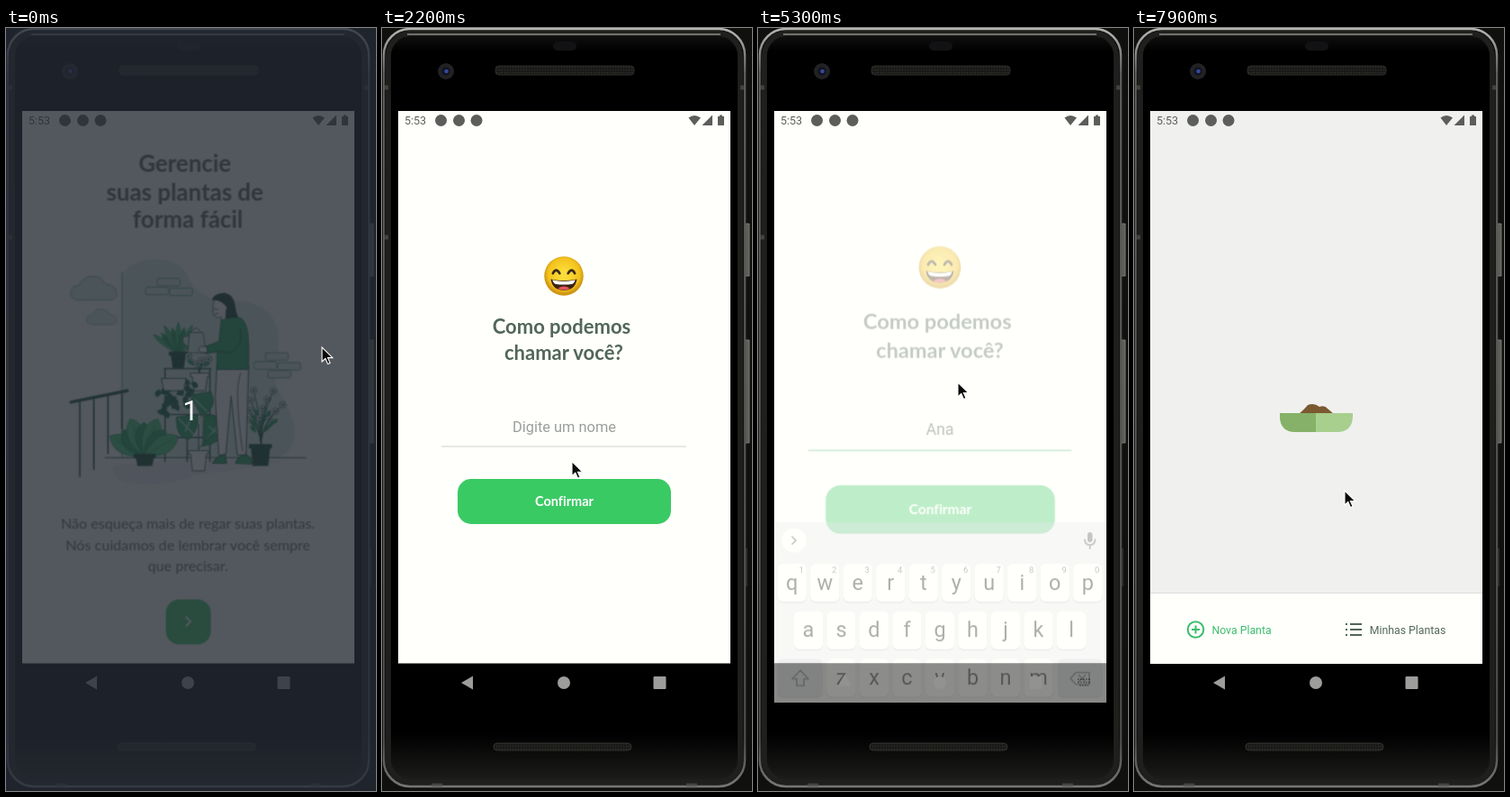
Write an HTML page that moves like this. It is 411x846 px and loops after 8000 ms.

```html
<!DOCTYPE html>
<html lang="pt-BR">
<head>
<meta charset="utf-8">
<title>Plantas</title>
<style>
html, body { margin: 0; width: 100%; height: 100%; overflow: hidden; background: #0c0c0b; }
svg { display: block; width: 100vw; height: 100vh; }
text { text-anchor: middle; font-family: Roboto, "Noto Sans", sans-serif; }
.jost { font-family: Lato, "Open Sans", sans-serif; fill: #5c6f64; font-variant-ligatures: none; }
.bold { font-weight: 700; fill: #52665a; }
.label { font-size: 14.5px; fill: #fff; }
.key { font-size: 23.5px; fill: #0c0c0c; }
.hint { font-size: 9.5px; fill: #55585c; }
.tip { font-size: 15.5px; fill: #55585c; }
.input { font-size: 16.4px; fill: #3a4a44; }
.card { transform-origin: 202px 405px; }
.line { fill: none; stroke: #4d5156; stroke-width: 1.7; stroke-linecap: round; stroke-linejoin: round; }
#back { transform-origin: 95px 726px; }
</style>
</head>
<body>
<svg viewBox="0 0 411 846" preserveAspectRatio="none">
  <defs>
    <clipPath id="screenClip"><path d="M18 92H387V704.500H18z"/></clipPath>
    <clipPath id="kbClip"><path d="M18 440H387V748H18z"/></clipPath>
    <linearGradient id="body" x2="0" y2="1">
      <stop offset="0" stop-color="#161616"/><stop offset=".03" stop-color="#000"/>
      <stop offset=".93" stop-color="#000"/><stop offset="1" stop-color="#20201e"/>
    </linearGradient>
    <linearGradient id="rim" x2="0" y2="1">
      <stop offset="0" stop-color="#b5b5b3"/><stop offset=".06" stop-color="#5c5c5a"/>
      <stop offset=".94" stop-color="#4a4a48"/><stop offset="1" stop-color="#777"/>
    </linearGradient>
    <radialGradient id="face" cy=".45">
      <stop offset=".2" stop-color="#fbdc38"/><stop offset=".8" stop-color="#f3c31d"/><stop offset="1" stop-color="#d09613"/>
    </radialGradient>
    <pattern id="mesh" width="3" height="3" patternUnits="userSpaceOnUse">
      <path d="M0 0H3V3H0z" fill="#191917"/><circle cx="1.500" cy="1.500" r=".8" fill="#30302c"/>
    </pattern>
    <g id="emoji">
      <circle r="37.500" fill="url(#face)"/>
      <path d="M-21-5Q-15-17-8-5M8-5Q15-17 21-5" fill="none" stroke="#3c2a18" stroke-width="4.500" stroke-linecap="round"/>
      <path d="M-25 6Q0 12 25 6Q22 27 0 27Q-22 27-25 6z" fill="#3d2213"/>
      <path d="M-22 7.500Q0 13 22 7.500Q20 14 17 15Q0 18-17 15Q-20 14-22 7.500z" fill="#fff"/>
      <path d="M-12 24Q0 16 12 24Q0 29-12 24z" fill="#e8565c"/>
    </g>
  </defs>

  <g id="phone">
    <path d="M0 0H411V846H0z" fill="#10100f"/>
    <path d="M403 217h5v58h-5zM403 346h5v114h-5z" fill="#5d5d59" stroke="#85857e" stroke-width=".8"/>
    <path d="M404 577h2v42h-2z" fill="#2a2a28"/>
    <rect x="2" y="1" width="401" height="840" rx="29" fill="url(#body)" stroke="url(#rim)" stroke-width="2.500"/>
    <rect x="7" y="6" width="391" height="830" rx="25" fill="none" stroke="#1f1f1d" stroke-width="6"/>
    <path d="M28 7H376" stroke="#8a8a88" stroke-width="1.500"/>
    <path d="M1 66h6M1 232h6M398 66h6M55 840h12M338 840h12" stroke="#5a5a57" stroke-width="5" opacity=".6"/>
    <rect x="190" y="15" width="26" height="10" rx="5" fill="#121214"/>
    <circle cx="71" cy="48" r="9" fill="#222225"/><circle cx="71" cy="48" r="4.500" fill="#10121f"/><circle cx="71.500" cy="48" r="2.300" fill="#38489a"/>
    <rect x="126" y="42" width="154" height="10" rx="4" fill="url(#mesh)" stroke="#2d2d29"/>
    <rect x="124" y="793" width="153" height="8" rx="4" fill="url(#mesh)" stroke="#33332f"/>
    <path d="M18 92H387V704.500H18z" fill="#fffffb"/>
  </g>

  <g clip-path="url(#screenClip)">
    <g id="welcome" class="card">
      <g font-size="26.500">
        <text class="jost bold" x="198.500" y="154">Gerencie</text>
        <text class="jost bold" x="198.500" y="186">suas plantas de</text>
        <text class="jost bold" x="202" y="217">forma fácil</text>
      </g>
      <g id="art" stroke-linecap="round" stroke-linejoin="round"></g>
      <g font-size="16.500">
        <text class="jost" x="202" y="559">Não esqueça mais de regar suas plantas.</text>
        <text class="jost" x="202" y="583">Nós cuidamos de lembrar você sempre</text>
        <text class="jost" x="202" y="607">que precisar.</text>
      </g>
      <g id="next">
        <rect x="177" y="639" width="51" height="51" rx="15" fill="#3aca64"/>
        <path d="M199.500 658.500l5.500 5.500-5.500 5.500" fill="none" stroke="#fff" stroke-width="2"/>
      </g>
    </g>

    <g id="naming" class="card"><g id="form">
      <use href="#emoji" transform="translate(202 275) scale(.58)"/>
      <g font-size="22">
        <text class="jost bold" x="199.500" y="339">Como podemos</text>
        <text class="jost bold" x="202" y="368">chamar você?</text>
      </g>
      <text id="placeholder" class="input" x="202.500" y="448" style="fill:#9b9f9c">Digite um nome</text>
      <g id="typed"></g>
      <path d="M66 464H338" stroke="#cfcfcf"/>
      <path id="focusLine" d="M66 464H338" stroke="#4dbb83" stroke-width="1.300"/>
      <g id="confirm">
        <rect x="84" y="500" width="237" height="50" rx="15" fill="#3aca64"/>
        <text class="jost bold label" x="202.500" y="530">Confirmar</text>
      </g>
    </g></g>

    <g id="done" class="card">
      <use href="#emoji" x="202" y="312"/>
      <text class="jost bold" x="202" y="393" font-size="28" style="fill:#0b0c0b">Prontinho!</text>
      <g font-size="15.400">
        <text class="jost" x="202" y="429">Agora vamos começar a cuidar das suas</text>
        <text class="jost" x="202" y="451">plantinhas com muito cuidado!</text>
      </g>
      <g id="start">
        <rect x="89" y="483" width="227" height="50" rx="15" fill="#3aca64"/>
        <text class="jost bold label" x="202.500" y="513">Começar</text>
      </g>
    </g>

    <g id="home" class="card">
      <path d="M18 92H387V705H18z" fill="#f0f1ee"/>
      <path d="M183 428Q190 422 193 418Q200 415 206 420Q212 418 215 422L222 428z" fill="#7b5931"/>
      <path d="M162 427H243V430Q243 448 225 448H180Q162 448 162 430z" fill="#a8cf8e"/>
      <path d="M162 427H202V448H180Q162 448 162 430z" fill="#85b168"/>
      <path d="M18 627H387V705H18z" fill="#fffffb"/><path d="M18 626.500H387" stroke="#dcdddb"/>
      <g fill="none" stroke="#3cbd6e" stroke-width="2"><circle cx="68.500" cy="667" r="8.800"/><path d="M68.500 662.500v9M64 667h9"/></g>
      <path d="M240 661h13M240 667h13M240 673h13M235 661h2M235 667h2M235 673h2" stroke="#52665a" stroke-width="2"/>
      <g font-size="12.300">
        <text x="119.500" y="671.500" fill="#3cbd6e">Nova Planta</text>
        <text x="304" y="671.500" fill="#52665a">Minhas Plantas</text>
      </g>
    </g>

    <g fill="#5c5e5c">
      <text x="37" y="107" font-size="12.500">5:53</text>
      <circle cx="65.500" cy="102.500" r="6.500"/><circle cx="85.500" cy="102.500" r="6.500"/><circle cx="105" cy="102.500" r="6.500"/>
      <path d="M340.500 99.500Q347 94.500 354 99.500L347 108zM367 96.500V108H355.500zM373 98h2v-1.500h3V98h2v10h-7z"/>
    </g>
  </g>

  <g clip-path="url(#kbClip)">
    <g id="keyboard">
      <path d="M18 451H387V900H18z" fill="#e8eaec"/>
      <g id="keys"></g>
      <circle cx="40" cy="471" r="13.500" fill="#fffffd"/>
      <g id="tools" class="line">
        <path d="M42 467l-4 4 4 4"/>
        <circle cx="88" cy="469.500" r="4.800"/><path d="M91.500 473l5 5"/>
        <path d="M137 464h12v9l-5 5h-9v-14zM144 478v-5h5M139 468h1m5 0h1m-7 4q2 2 4 0"/>
        <text x="195" y="475" font-size="11.500" font-weight="700" fill="#4d5156" stroke="none">GIF</text>
        <path d="M243.500 465h11v13h-11zM247 463.500h4v3h-4zM246 470h6M246 474h6"/>
        <path d="M282 461v20" stroke="#cfd2d5" stroke-width="1"/>
        <path d="M309 471h.1m5.400 0h.1m5.400 0h.1" stroke-width="3.500"/>
      </g>
      <g id="tips"><path class="line" d="M38 467l4 4-4 4"/></g>
      <rect x="366" y="462" width="5.500" height="11" rx="2.700" fill="#4d5156"/>
      <path class="line" d="M363 470q0 6 5.700 6t5.700-6M368.700 476v4"/>
    </g>
    <g id="whiteBar">
      <path d="M18 705H387V748H18z" fill="#fffffb"/>
      <path d="M355 722h14M355 725.500h14M357 729h10" stroke="#8a8a8a" stroke-width="1.800" stroke-dasharray="1.800 1.200"/>
    </g>
  </g>

  <g id="nav">
    <path id="back" d="M101 718.500V733.500L88 726z"/><circle cx="202" cy="726" r="7"/><rect x="301.500" y="719" width="14" height="14" rx="1"/>
  </g>

  <g id="countdown">
    <path d="M0 0H411V846H0z" fill="#262a34" opacity=".79"/>
    <text x="205" y="435" font-size="31" fill="#fff">1</text>
  </g>
  <path id="mouse" d="M0 0V16L3.800 12.500 6.500 18.600 9 17.400 6.400 11.600H11.800z" fill="#0a0a0a" stroke="#fff" stroke-width="1.100"/>
</svg>

<script>
const LOOP = 8000, ENTER = 400, LEAVE = 300, SLIDE = 300;
const KB_OPEN = 2450, KB_CLOSE = 5100;
const $ = id => document.getElementById(id);
const add = (id, markup) => $(id).insertAdjacentHTML('beforeend', markup);
const repeat = (n, make) => Array.from({ length: n }, (_, i) => make(i)).join('');

let seed = 7;
const random = (min, max) => {
  seed = seed * 16807 % 2147483647;
  return min + (max - min) * seed / 2147483647;
};

// --- Motion helpers; steps are [ms, style] and the ends are held
function play(id, steps, easing = 'linear') {
  const all = [[0, steps[0][1]], ...steps, [LOOP, steps.at(-1)[1]]];
  $(id).animate(all.map(([ms, style]) => ({ offset: ms / LOOP, easing, ...style })),
    { duration: LOOP, iterations: Infinity });
}
function show(id, from, to = LOOP) {
  const steps = [[from, { opacity: 1 }], [to, { opacity: to < LOOP ? 0 : 1 }]];
  play(id, from ? [[0, { opacity: 0 }], ...steps] : steps, 'step-end');
}
function card(id, enterAt, leaveAt, from = { opacity: 0, scale: .88 }, to = { opacity: 0, scale: 1.11 }) {
  const shown = { opacity: 1, scale: 1 };
  const exit = leaveAt ? [[leaveAt, shown], [leaveAt + LEAVE, to]] : [];
  play(id, [[enterAt, from], [enterAt + ENTER, shown], ...exit]);
}
const press = (id, ms, opacity) =>
  play(id, [1, opacity, opacity, 1].map((value, i) => [ms + i * 100, { opacity: value }]));
const withKeyboard = (id, closed, open) =>
  play(id, [[KB_OPEN, closed], [KB_OPEN + SLIDE, open], [KB_CLOSE, open], [KB_CLOSE + SLIDE, closed]]);

// --- Illustration
const DARK = '#18573a', MID = '#20a957', BRIGHT = '#42cf75', PALE = '#d8f2e2', WHITE = '#fffffb';
const path = (d, fill = 'none', stroke = 'none', width = 1) =>
  `<path d="${d}" fill="${fill}" stroke="${stroke}" stroke-width="${width}"/>`;
const leaf = (x, y, angle, length, width, fill) =>
  `<path transform="translate(${x} ${y}) rotate(${angle})" d="M0 0Q${width} ${-length * .65} 0 ${-length}Q${-width} ${-length * .65} 0 0V${-length * .8}" fill="${fill}" stroke="#178a48" stroke-width=".6"/>`;
const fan = (x, y, count, spread, length, width) => repeat(count, i => {
  const angle = (i / (count - 1) - .5) * spread;
  return leaf(x, y, angle, length * (1 - i % 2 * .15), width, i % 2 ? MID : BRIGHT);
});
const pot = (x, y, w, h, fill) => path(`M${x} ${y}h${w}v4h-2l-2 ${h - 4}h${8 - w}l-2 ${4 - h}h-2z`, fill, DARK, .9);
const flower = (x, y) => repeat(5, i =>
  `<circle cx="${x + 2.4 * Math.cos(i * 1.257)}" cy="${y + 2.4 * Math.sin(i * 1.257)}" r="1.700" fill="${WHITE}" stroke="${DARK}" stroke-width=".6"/>`) +
  `<circle cx="${x}" cy="${y}" r="1" fill="${MID}"/>`;
const bouquet = (x, y, count, spread, length) => repeat(count, i => {
  const angle = (i / (count - 1) - .5) * spread, reach = length * (1 - i * 3 % 4 * .17);
  const tipX = x + reach * Math.sin(angle), tipY = y - reach * Math.cos(angle);
  return path(`M${x} ${y}Q${x} ${(y + tipY) / 2} ${tipX} ${tipY}`, 'none', DARK) +
    leaf((x + tipX) / 2, (y + tipY) / 2, angle * 90, 9, 4, MID) + flower(tipX, tipY);
});
const brick = (x, y) => `<rect x="${x}" y="${y}" width="26" height="8.500" rx="2" fill="${PALE}" stroke="#5fa37d"/>`;
const wall = (x, y) => brick(x, y) + brick(x - 13, y + 10) + brick(x + 14, y + 11);
const cloud = (x, y, size) =>
  `<path transform="translate(${x} ${y}) scale(${size})" d="M-18 12Q-27 11-26 3Q-25-5-17-4Q-12-16 0-15Q10-14 13-6Q26-5 26 4Q26 12 18 12z" fill="${PALE}" stroke="#7dba96"/>`;

add('art', [
  path('M118 487Q190 476 310 482Q270 492 215 497Q170 514 130 506Q112 499 118 487z', '#f0f1ee'),
  path('M127 478V270Q139 253 164 253Q192 253 201 271Q211 296 242 300Q296 297 304 334Q306 362 300 386Q303 402 316 422Q335 461 306 478z', PALE),
  path('M127 268V478', 'none', '#69a584'), path('M108 478H336', 'none', DARK, 1.1),
  cloud(95, 287, 1), cloud(104, 319, .65),
  wall(167, 274.5), wall(290, 359), brick(293, 379),
  path('M69 415L133 402', 'none', DARK, 3.5),
  repeat(4, i => path(`M${79 + i * 16} ${415 - i * 3}v${84 - i * i * 5}`, 'none', DARK, 1.8)),
  path('M175 377H228M175 429H228M178 455H228M176 377V482M227 377V482M201 429V482', 'none', DARK, 1.5),
  fan(191, 360, 9, 105, 36, 6), pot(181, 358, 20, 18, '#0f4b2c'),
  path('M204 336h15l4 23h-21zM203 340Q193 339 197 348L202 353M206 335q5-9 10 0', PALE, DARK, .8),
  bouquet(215, 383, 4, 1.1, 24), pot(205, 382, 21, 20, WHITE),
  repeat(30, () => leaf(random(167, 210), random(390, 428), random(0, 360), 9, 6, DARK)),
  path('M172 388h28l-3 14h-22z', '#eef9f0', DARK),
  path('M189 432L213 429Q215 447 203 457Q188 456 189 432zM220 431Q236 424 245 443Q243 461 219 465zM204 407l24-4q9 17-10 28z', MID, DARK, .7),
  path('M192 434l16 17m-3-17l-6 14M224 457l14-18m-12 4l10 7m-26-38l13 13', 'none', '#9be5b5', 1.8),
  path('M214 470V440M214 468L229 452', 'none', DARK), pot(203, 470, 22, 23, WHITE),
  fan(152, 476, 7, 120, 45, 20), pot(141, 474, 24, 13, '#0f4b2c'),
  bouquet(285, 463, 12, 1, 62), pot(272, 463, 25, 24, '#0f4b2c'),
  path('M235 372L233 410L237 475H245L251 408L258 475H268L271 374z', WHITE, DARK),
  path('M262 382Q254 400 264 470', 'none', '#8a9b92', 1.6),
  path('M230 484Q233 477 244 474l2 10zM256 484Q258 476 268 474Q276 480 275 485z', MID, DARK, .9),
  path('M232 299Q228 311 232 317Q237 321 240 318V323H249V301z', WHITE, DARK, .8),
  path('M232 309l4 1M233 315l3-1', 'none', DARK, .9),
  path('M229 299Q232 291 244 291Q255 294 256 307Q257 317 262 323Q257 333 247 330Q243 317 246 307Q239 298 229 299z', '#153e2b'),
  path('M240 322Q252 317 263 320Q271 328 271 350V378H235V358L222 360L219 353L237 346z', MID, DARK, .8),
  path('M262 332Q265 352 250 359L236 357', 'none', DARK, .9),
  path('M223 352Q214 350 214 356Q218 361 224 358z', WHITE, DARK, .8)
].join(''));

// --- Keyboard
const GREY = '#cbced4', PITCH = 36.5;
const rows = ['qwertyuiop', 'asdfghjkl', 'zxcvbnm'];
const rowY = row => 497 + row * 52.7;
const keyX = (row, i) => 202 + (i - (rows[row].length - 1) / 2) * PITCH;
const keyBox = (x, y, width, fill = '#fffffd') => [['#bfc2c6', 1.2], [fill, 0]].map(([color, dy]) =>
  `<rect x="${x}" y="${y + dy}" width="${width}" height="42" rx="6" fill="${color}"/>`).join('');
const eachKey = make => rows.map((row, r) => [...row].map((c, i) => make(c, keyX(r, i), rowY(r))).join('')).join('');
const letter = (c, x, y) => `<text class="key" x="${x}" y="${y + 28.5}">${c}</text>`;
const shift = 'M47 615L38 624.500H43V632H51V624.500H56z';

let nextX = 22;
const bottomRow = [[49.5, GREY], [32, GREY], [32], [142], [32, GREY], [49.5, '#2472dc']].map(([width, fill]) => {
  const box = keyBox(nextX, rowY(3), width, fill);
  nextX += width + 4.7;
  return box;
}).join('');

add('keys', eachKey((c, x, y) => keyBox(x - 16, y, 32)) + bottomRow +
  keyBox(22, rowY(2), 49.5, GREY) + keyBox(333, rowY(2), 49.5, GREY) +
  repeat(10, i => `<text class="hint" x="${keyX(0, i) + 10.5}" y="507">${(i + 1) % 10}</text>`) +
  `<g id="upper">${eachKey((c, x, y) => letter(c.toUpperCase(), x, y))}<path d="${shift}" fill="#303236"/></g>
   <g id="lower">${eachKey(letter)}<path class="line" d="${shift}"/></g>
   <path class="line" d="M353 617.500h15v13h-15l-6-6.500zM356.500 620.500l7 7m0-7l-7 7"/>
   <text x="46.500" y="682" font-size="16" fill="#3a3d41">?123</text>
   <text class="key" x="92" y="685">,</text><text class="key" x="311.500" y="685">.</text>
   <circle class="line" cx="129" cy="676" r="8.500"/><path class="line" d="M126 673.500h.1m5.900 0h.1M124.500 678q4.500 5 9 0"/>
   <path d="M350 676.500l5 5 10-10" fill="none" stroke="#fff" stroke-width="2"/>`);

// --- Typing
const NAME = 'Ana', KEY_TIMES = [3300, 4000, 4400], TYPED = 4900;
const addCaret = (parent, x) => add(parent, path(`M${x} 431V454`, 'none', '#23795f', 1.6));
add('typed', '<g id="caret"></g>');
addCaret('caret', 202.5);
show('caret', 2500, 3000);

KEY_TIMES.forEach((ms, i) => {
  const word = NAME.slice(0, i + 1), end = KEY_TIMES[i + 1] ?? TYPED;
  add('typed', `<g id="word${i}"><text class="input" x="202" y="448" text-decoration="underline">${word}</text></g>`);
  addCaret('word' + i, 203 + $('word' + i).firstChild.getComputedTextLength() / 2);
  const tips = [word, 'Hi', ['Ao', 'Ana', 'Anas'][i]].map((text, n) =>
    `<text class="tip" x="${99 + n * 102}" y="477" font-weight="${n === 1 ? 700 : 400}">${text}</text>`);
  add('tips', `<g id="tip${i}">${tips.join('')}${path('M147.500 460v22M255.500 460v22', 'none', '#c3c6ca')}</g>`);
  show('word' + i, ms, end);
  show('tip' + i, ms, end);
});
add('typed', `<text id="fullName" class="input" x="202" y="448">${NAME}</text>`);
show('fullName', TYPED);
show('placeholder', 0, KEY_TIMES[0]);
show('upper', 0, KEY_TIMES[0]);
show('tools', 0, KEY_TIMES[0]);
show('lower', KEY_TIMES[0]);
show('tips', KEY_TIMES[0]);
show('focusLine', KB_OPEN);

// --- Screens
show('countdown', 0, 100);
card('welcome', 50, 1600, { opacity: 1, scale: .977 }, { opacity: 0, scale: 1 });
card('naming', 1650, KB_CLOSE);
card('done', 5400, 7050);
card('home', 7100);
press('next', 1350, .72);
press('confirm', 4800, .3);
press('start', 6800, .2);

withKeyboard('keyboard', { opacity: 0, translate: '0 145px' }, { opacity: 1, translate: '0 0px' });
withKeyboard('whiteBar', { opacity: 0 }, { opacity: 1 });
withKeyboard('nav', { fill: '#9d9d9b' }, { fill: '#7b7b7a' });
withKeyboard('back', { rotate: '0deg' }, { rotate: '-90deg' });
play('form', [[0, 0], [KB_OPEN + 100, -127], [KB_CLOSE, 0]].map(([ms, y]) => [ms, { translate: `0 ${y}px` }]), 'step-end');

// The pointer rests at each stop and sets off in time for the next; longer ways take longer
const stops = [[0, 351, 354], [400, 341, 427], [900, 251, 598], [1200, 214, 640], [1400, 211, 647], [2300, 211, 457],
  [3300, 205, 571], [3950, 302, 518], [4400, 324, 520], [4900, 222, 393], [5900, 222, 519], [7900, 234, 513]];
play('mouse', stops.flatMap(([ms, x, y], i) => {
  const at = (px, py) => ({ translate: `${px}px ${py}px` });
  if (!i) return [[ms, at(x, y)]];
  const [, fromX, fromY] = stops[i - 1];
  const travel = 80 + 1.7 * Math.hypot(x - fromX, y - fromY);
  return [[ms - travel, at(fromX, fromY)], [ms, at(x, y)]];
}), 'ease-in-out');
</script>
</body>
</html>
```
